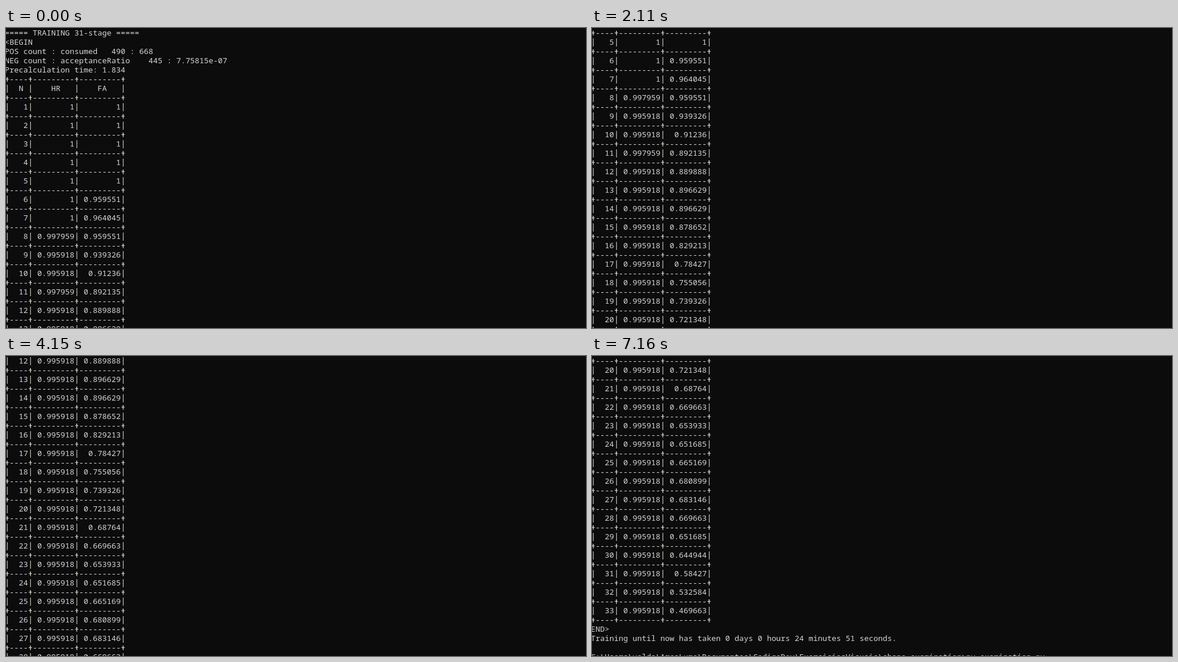
These frames come from a looping animation (1001 px wide and 519 px high, 8 s). An HTML page:

```html
<!DOCTYPE html>
<html lang="en">
<head>
<meta charset="utf-8">
<title>Training log</title>
<style>
  html, body {
    margin: 0;
    width: 100%;
    height: 100%;
    overflow: hidden;
    background: #0c0c0c;
  }
  #screen {
    position: relative;
    width: 100%;
    height: 100%;
    overflow: hidden;
    contain: strict;
  }
  #log {
    position: absolute;
    left: -2px;
    top: 0;
    margin: 0;
    color: #d6d6d6;
    font: 13.3333px/16px "Noto Sans Mono", "DejaVu Sans Mono", monospace;
    font-variant-ligatures: none;
    white-space: pre;
  }
  /* Crisp stems with the blue and orange fringes of subpixel text. */
  .bar, .plus {
    display: inline-block;
    width: 8px;
    height: 16px;
    vertical-align: top;
    background: linear-gradient(90deg, #17456f 50%, #e0ae6c 50%) 3px 2px / 2px 14px no-repeat;
  }
  .bar { color: transparent; }
  .plus { background-position: 3px 5px; background-size: 2px 8px; }
</style>
</head>
<body>
<div id="screen"><pre id="log"></pre></div>
<script>
  const LOOP = 8000, NOTCH = 48, BEAT = 70;
  const log = document.getElementById('log');

  // Training curve as [round, false alarms], joined by straight lines.
  const curve = [[6, 429], [15, 386], [21, 299], [30, 295], [33, 201]];
  const ratio = (count, total) => Number((count / total).toPrecision(6));

  function falseAlarmRate(n) {
    if (n < 6) return 1;
    const i = Math.max(1, curve.findIndex(([round]) => n <= round));
    const [[n0, a], [n1, b]] = [curve[i - 1], curve[i]];
    const trend = a + (b - a) * (n - n0) / (n1 - n0);
    return ratio(Math.round(trend + 8 * Math.sin(n)), 445);
  }

  function hitRate(n) {
    const misses = n < 8 ? 0 : n === 8 || n === 11 ? 1 : 2;
    return ratio(490 - misses, 490);
  }

  const bar = '<span class="bar">|</span>';
  const plus = '<span class="plus">+</span>';
  const widths = [4, 9, 9];
  const row = (...cells) => ['', ...cells, ''].join(bar);
  const rule = ['', ...widths.map(w => '-'.repeat(w)), ''].join(plus);
  const numbers = (...values) => row(...values.map((v, i) => String(v).padStart(widths[i])));

  const lines = [
    '===== TRAINING 31-stage =====',
    '&lt;BEGIN',
    'POS count : consumed   490 : 668',
    'NEG count : acceptanceRatio    445 : 7.75815e-07',
    'Precalculation time: 1.834',
    rule,
    row('  N ', '    HR   ', '    FA   '),
    rule
  ];
  for (let n = 1; n <= 33; n++) {
    lines.push(numbers(n, hitRate(n), falseAlarmRate(n)), rule);
  }
  lines.push(
    'END&gt;',
    'Training until now has taken 0 days 0 hours 24 minutes 51 seconds.',
    '',
    'C:\\Users\\velda\\ArcaLume\\Documentos\\CodigoDev\\ExerciciosVisuais\\shape_examination&gt;py examination.py'
  );
  log.innerHTML = lines.join('\n');

  // The wheel turns in a steady rhythm, with a long rest before the last notch.
  const turn = [6, 5, 7];
  const rests = [6, 5, 5, 7, 6, 5, ...turn, ...turn, 6, 19];
  let time = 500;
  const notches = [time, ...rests.map(beats => time += beats * BEAT)];

  function draw(now) {
    const t = now % LOOP;
    const turned = notches.filter(at => at <= t).length;
    log.style.top = -turned * NOTCH + 'px';
    requestAnimationFrame(draw);
  }
  requestAnimationFrame(draw);
</script>
</body>
</html>
```
